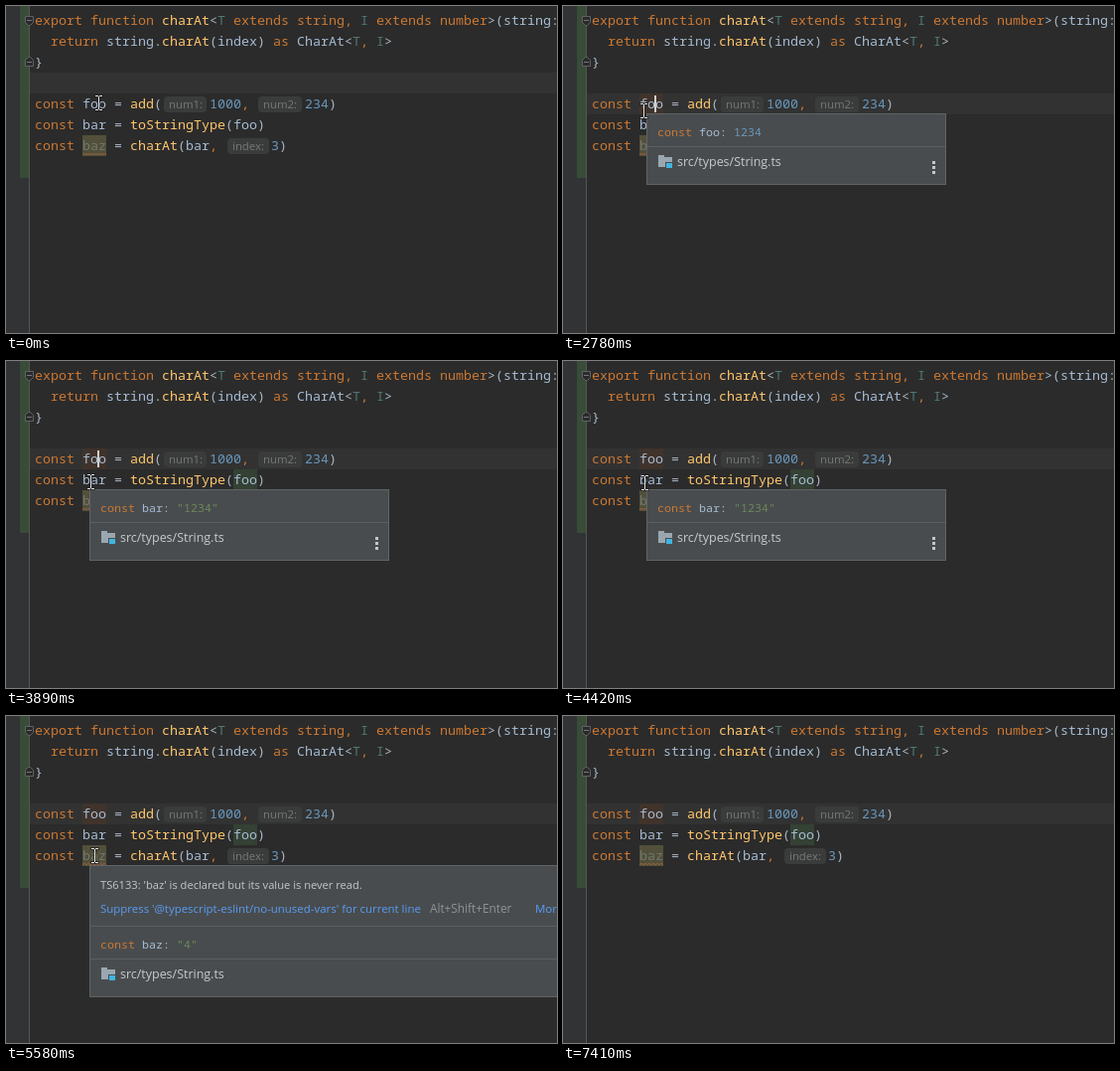
An HTML page with a canvas that plays this animation: 555 by 329 pixels, repeating every 7710 ms.

```html
<!DOCTYPE html>
<html lang="en">
<head>
<meta charset="utf-8">
<title>Type hints in an editor</title>
<style>
  html, body { margin: 0; width: 100%; height: 100%; overflow: hidden; background: #2b2b2b; }
  canvas { display: block; }
</style>
</head>
<body>
<canvas id="stage" width="555" height="329"></canvas>
<script>
const ctx = document.getElementById('stage').getContext('2d');
const LOOP = 7710, CLICK = 760, MARK = 930, LEAVE = 7010;
const BLINK = 514, BLINK_START = 720;
const TICK = 78; // the pointer moves in visible steps
const ROW = 21;

// Syntax groups, in the order of the capture groups below
const SYNTAX = /(\b(?:export|function|extends|return|as|const|number|string(?=,))\b|,)|(\b(?:charAt|add|toStringType)\b)|(\b[TI]\b)|(".*?")|(\b\d+)|(\w+)|(\S)/g;
const COLORS = ['#cc7832', '#ffc66d', '#507874', '#6a8759', '#6897bb', '#a5bbd3', '#a9b7c6'];

// Each move is a quadratic curve that starts where the last one ended
const HOME = [93, 97];
const MOVES = [
  { start: 1080, end: 1160, bend: [99, 91], to: [105, 85] },
  { start: 1310, end: 1460, bend: [96, 94], to: [86, 104] },
  { start: 2780, end: 3340, bend: [23, 110], to: [85, 121] },
  { start: 4350, end: 5030, bend: [39, 132], to: [89, 140] },
  { start: 6540, end: 6940, bend: [281, 220], to: [472, 299] }
];

const POPUPS = [
  { from: 2020, to: 2940, top: 108, height: 72, width: 302, line: 'const foo: 1234' },
  { from: 3890, to: 4500, top: 129, height: 72, width: 302, line: 'const bar: "1234"' },
  { from: 5580, to: LEAVE, top: 150, height: 133, width: 490, line: 'const baz: "4"', warning: true }
];

const baseline = row => 19 + row * ROW;

function rect(x, y, w, h, color) {
  ctx.fillStyle = color;
  ctx.fillRect(x, y, w, h);
}

function text(str, x, y, size, color) {
  ctx.font = `${size}px "Open Sans", "Noto Sans", sans-serif`;
  ctx.fillStyle = color;
  ctx.fillText(str, x, y);
}

function code(str, x, y, pitch = 8) {
  ctx.font = `500 ${pitch / 0.6}px "Noto Sans Mono", monospace`;
  for (const m of str.matchAll(SYNTAX)) {
    ctx.fillStyle = COLORS[m.slice(1).findIndex(Boolean)];
    ctx.fillText(m[0], x + m.index * pitch, y);
  }
}

function hint(str, x, y, w) {
  ctx.fillStyle = '#3a3b3b';
  ctx.beginPath();
  ctx.roundRect(x, y - 12, w, 16, 4);
  ctx.fill();
  text(str, x + 5, y, 11.4, '#787878');
}

// House-shaped fold mark; dir is 1 when it points down, -1 when up
function foldMark(y, dir) {
  ctx.beginPath();
  for (const [dx, dy] of [[-4, -4], [4, -4], [4, 2], [1, 5], [-1, 5], [-4, 2]])
    ctx.lineTo(23.5 + dx, y + dy * dir);
  ctx.closePath();
  ctx.fillStyle = '#2b2b2b';
  ctx.fill();
  ctx.strokeStyle = '#606366';
  ctx.stroke();
  rect(21, Math.floor(y), 5, 1, '#737679');
}

function squiggle(x, y, w) {
  ctx.beginPath();
  for (let i = 0; i <= w; i += 2) ctx.lineTo(x + i, y + i % 4 / 2 * -1);
  ctx.strokeStyle = '#9a6240';
  ctx.stroke();
}

function editor(t) {
  rect(0, 0, 555, 329, '#2b2b2b');
  rect(0, 0, 23, 329, '#313335');
  rect(14, 0, 9, 173, '#384c38');
  rect(23, 0, 1, 329, '#555555');
  rect(24, t < CLICK ? 67 : 88, 531, ROW, '#323232');
  foldMark(14.5, 1);
  foldMark(56.5, -1);
  if (t >= MARK) {
    rect(77, 88, 24, ROW, '#40332b');
    rect(229, 109, 24, ROW, '#344134');
  }
  rect(77, 130, 24, ROW, '#52503a');

  code('export function charAt<T extends string, I extends number>(string: T, index: I)', 29, baseline(0));
  code('return string.charAt(index) as CharAt<T, I>', 45, baseline(1));
  code('}', 29, baseline(2));
  code('const foo = add(', 29, baseline(4));
  hint('num1:', 159, baseline(4), 43);
  code('1000,', 205, baseline(4));
  hint('num2:', 254, baseline(4), 44);
  code('234)', 301, baseline(4));
  code('const bar = toStringType(foo)', 29, baseline(5));
  code('const     = charAt(bar,', 29, baseline(6));
  ctx.fillStyle = '#72776f';
  ctx.fillText('baz', 77, baseline(6));
  squiggle(77, 149.5, 24);
  hint('index:', 223, baseline(6), 42);
  code('3)', 267, baseline(6));

  const caretOn = Math.floor((t - BLINK_START) / BLINK) % 2 === 0;
  if (t >= CLICK && caretOn) rect(92, 90, 2, 17, '#d0d0d0');
}

function folder(x, y) {
  rect(x, y, 6, 3, '#9aa7b0');
  rect(x, y + 2, 14, 10, '#9aa7b0');
  rect(x + 7, y + 7, 7, 6, '#494c4e');
  rect(x + 8, y + 8, 6, 5, '#40b6e0');
}

function popup({ top, height, width, line, warning }) {
  const left = 84, bottom = top + height;
  const divider = y => rect(left + 1, y, width - 2, 1, '#5c5f61');
  rect(left, top, width, height, '#616365');
  rect(left + 1, top + 1, width - 2, height - 2, '#494c4e');
  divider(bottom - 39);
  if (warning) {
    divider(top + 61);
    text("TS6133: 'baz' is declared but its value is never read.", 95, top + 24, 11.14, '#c4c6c8');
    text("Suppress '@typescript-eslint/no-unused-vars' for current line", 95, top + 48, 11.44, '#589df6');
    text('Alt+Shift+Enter', 427, top + 48, 11.8, '#919395');
    text('More actions...', 533, top + 48, 11.44, '#589df6');
  }
  code(line, 95, bottom - 49, 7);
  folder(96, bottom - 30);
  text('src/types/String.ts', 115, bottom - 19, 12.47, '#c8cacc');
  for (let i = 0; i < 3; i++) rect(left + width - 14, bottom - 24 + i * 5, 3, 3, '#c4c6c8');
}

function pointerAt(t) {
  let at = HOME;
  for (const { start, end, bend, to } of MOVES) {
    if (t < start) break;
    const steps = Math.round((end - start) / TICK);
    const step = Math.floor((t - start) / (end - start) * steps);
    const p = Math.min(1, (step + 1) / (steps + 1));
    const e = p * p * (3 - 2 * p);
    at = at.map((a, i) => Math.round(a * (1 - e) ** 2 + 2 * bend[i] * e * (1 - e) + to[i] * e * e));
  }
  return at;
}

function pointer([x, y]) {
  const beam = (grow, color) => {
    const bar = (dx, dy, w, h) => rect(x + dx - grow, y + dy - grow, w + 2 * grow, h + 2 * grow, color);
    bar(0, -6, 1, 13);
    for (const dx of [-3, 1]) for (const dy of [-7, 7]) bar(dx, dy, 3, 1);
  };
  beam(1, '#1c1c1c99');
  beam(0, '#e4e4e4');
}

function frame(now) {
  const t = now % LOOP;
  editor(t);
  POPUPS.filter(p => t >= p.from && t < p.to).forEach(popup);
  if (t < LEAVE) pointer(pointerAt(t));
  requestAnimationFrame(frame);
}
requestAnimationFrame(frame);
</script>
</body>
</html>
```
